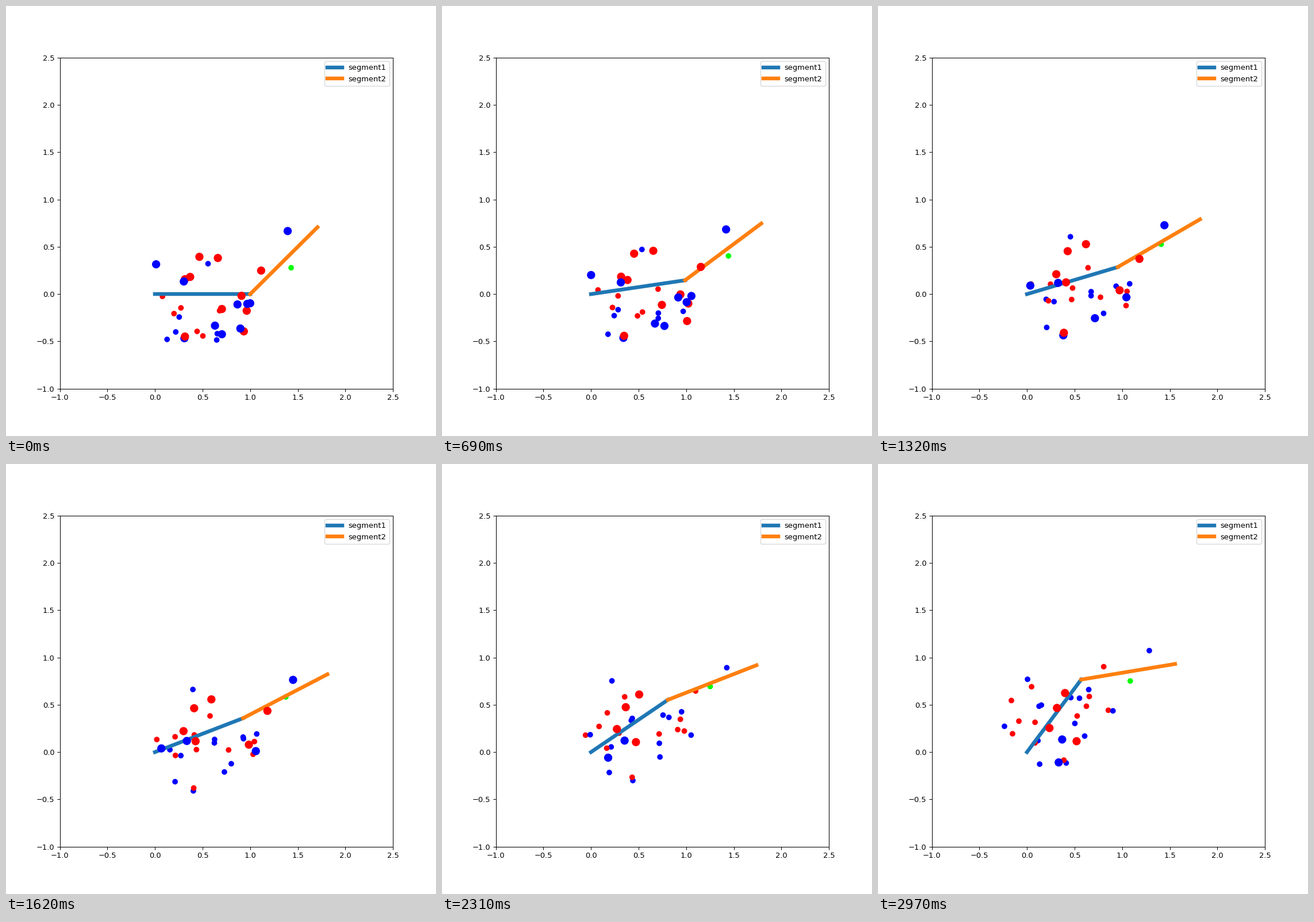
A matplotlib script for the animation above (3000 ms loop, 748 by 748 pixels).

```python
import numpy as np
import matplotlib.pyplot as plt
from matplotlib.animation import FuncAnimation

FRAMES = 100
UNIT = 165  # pixels per axes unit

# Each dot: colour, start and end in pixels from the shoulder (x + yj, y up).
light = [
    ("red", 13 - 4j, -25 + 32j), ("red", 45 - 24j, -14 + 54j),
    ("red", 112 - 29j, 8 + 114j), ("red", 73 - 65j, 14 + 52j),
    ("red", 83 - 73j, -27 + 90j), ("blue", 92 + 53j, 1 + 127j),
    ("blue", 36 - 66j, -39 + 45j), ("blue", 108 - 69j, 25 + 82j),
    ("blue", 107 - 80j, 21 + 80j), ("blue", 42 - 40j, 19 + 20j),
    ("blue", 21 - 79j, 22 - 21j), ("red", 33 - 34j, 14 + 16j),
    ("lime", 236 + 46j, 179 + 124j),
]
heavy = [
    ("red", 77 + 65j, 52 + 77j), ("red", 109 + 63j, 66 + 103j),
    ("red", 52 + 26j, 39 + 42j), ("red", 61 + 30j, 86 + 19j),
    ("blue", 2 + 52j, 55 - 18j), ("blue", 50 + 22j, 61 + 22j),
]
shrinking = [
    ("red", 184 + 41j, 133 + 149j), ("red", 150 - 3j, 141 + 73j),
    ("red", 159 - 29j, 108 + 97j), ("red", 154 - 65j, 103 + 80j),
    ("red", 116 - 26j, 87 + 63j), ("blue", 230 + 110j, 212 + 177j),
    ("blue", 104 - 55j, 100 + 28j), ("blue", 116 - 70j, 83 + 50j),
    ("blue", 148 - 60j, 76 + 95j), ("blue", 143 - 18j, 91 + 94j),
    ("blue", 160 - 17j, 149 + 72j), ("blue", 165 - 16j, 107 + 109j),
    ("blue", 51 - 77j, 68 - 19j), ("red", 52 - 74j, 64 - 14j),
]

colors, start, end = map(np.array, zip(*light, *heavy, *shrinking))
start, end = start / UNIT, end / UNIT

# The wider a dot swings round the shoulder, the sooner it shrinks.
swing = np.degrees(np.angle(end / start))
release = np.clip(108 - 1.35 * swing, 0, 62)
kind = np.repeat([0, 1, 2], [len(light), len(heavy), len(shrinking)])
release = np.choose(kind, [0, FRAMES, release])

# Spiral arcs: a late release means a slower start and a tighter turn.
lag = np.where(kind == 2, release, 0)
rate = 0.5 + 0.035 * lag + 1j * np.radians(100 + 0.35 * lag)


def dots_at(u):
    z = start + (end - start) * np.expm1(rate * u) / np.expm1(rate)
    return np.column_stack([z.real, z.imag])


def arm_at(u):
    """Joint and tip of the arm as complex numbers."""
    angle1 = 36 * u + 17.4 * u**4
    angle2 = 45 - 35.5 * u + 50 * u**4 * (1 - u)
    joint = (1 - 0.045 * u**3) * np.exp(1j * np.radians(angle1))
    return joint, joint + np.exp(1j * np.radians(angle2))


fig, ax = plt.subplots(figsize=(8, 8), dpi=93.5)
fig.subplots_adjust(left=0.125, right=0.9, bottom=0.11, top=0.88)
ax.set(xlim=(-1, 2.5), ylim=(-1, 2.5))

small = ax.scatter([], [], s=36, linewidths=1.5, zorder=1)
seg1, = ax.plot([], [], lw=5, label="segment1")
seg2, = ax.plot([], [], lw=5, label="segment2")
large = ax.scatter([], [], s=100, linewidths=1, zorder=3)
ax.legend(loc="upper right")


def update(i):
    u = i / (FRAMES - 1)
    joint, tip = arm_at(u)
    seg1.set_data([0, joint.real], [0, joint.imag])
    seg2.set_data([joint.real, tip.real], [joint.imag, tip.imag])
    points = dots_at(u)
    big = i < release
    for group, mask in ((small, ~big), (large, big)):
        group.set_offsets(points[mask])
        group.set_color(list(colors[mask]))
    return small, seg1, seg2, large


anim = FuncAnimation(fig, update, frames=FRAMES, interval=30, repeat=True, repeat_delay=0)
plt.show()
```
